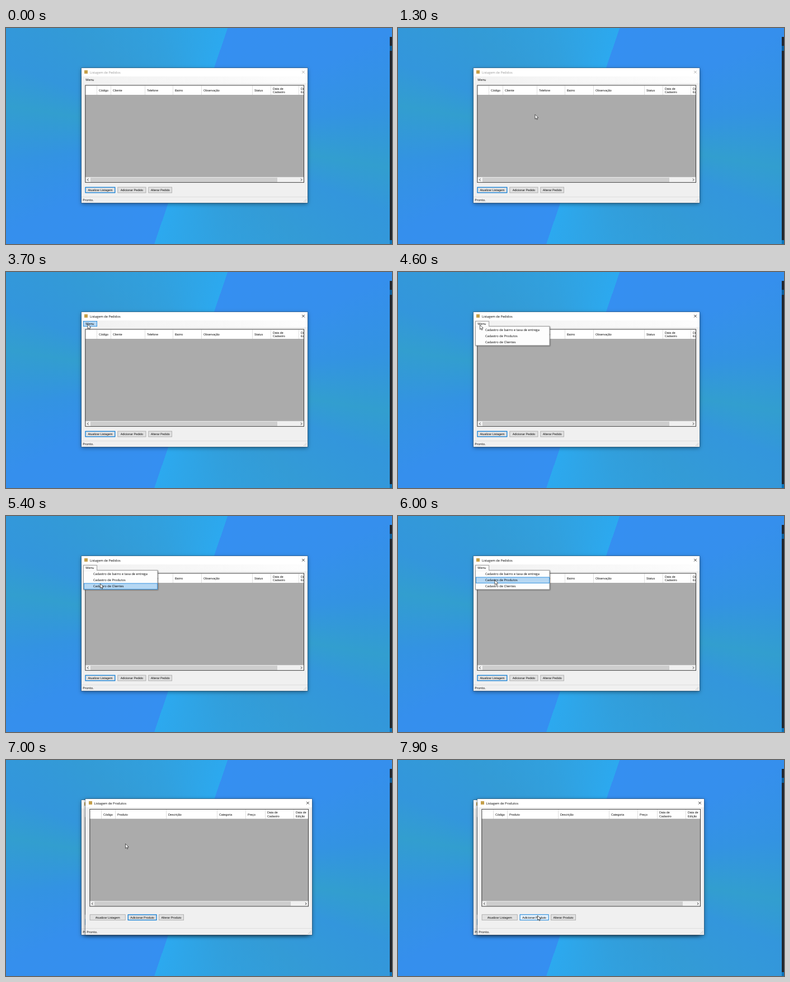
These frames come from a looping animation (690x388 px, 8000 ms). An HTML page with a canvas:

```html
<!DOCTYPE html>
<html lang="pt">
<head>
<meta charset="utf-8">
<style>
html, body { margin: 0; width: 100%; height: 100%; overflow: hidden; background: #3394e0; }
canvas { display: block; }
</style>
</head>
<body>
<canvas id="stage" width="690" height="388"></canvas>
<script>
const W = 690, H = 388, LOOP = 8000, STEP = 100;
const UI = '5.7px "Open Sans", sans-serif';
const GRID = '5.35px "Liberation Sans", Arial, sans-serif';
const BLUE = '#0078d7', PALE = '#b5d7f3', FACE = '#f0f0f0', INK = '#000';

const stage = document.getElementById('stage').getContext('2d');
const layerCanvas = document.createElement('canvas');
layerCanvas.width = W;
layerCanvas.height = H;
const layer = layerCanvas.getContext('2d');

const orders = {
  x: 135, y: 72, w: 404, h: 242, title: 'Listagem de Pedidos', titleX: 150, icon: 140, closeX: 531.5,
  grid: {
    x: 141.4, y: 102.5, w: 391.6, h: 175.3, thumb: [151, 485],
    cols: [[162, 'Código'], [187, 'Cliente'], [248, 'Telefone'], [298, 'Bairro'], [349, 'Observação'],
      [440, 'Status'], [473, 'Data de', 'Cadastro'], [523, 'Data de', 'Edição']]
  },
  buttonY: 285.6, focus: 0,
  buttons: [[141.4, 54, 'Atualizar Listagem'], [199.4, 51, 'Adicionar Pedido'], [254.4, 42.6, 'Alterar Pedido']],
  statusY: 303
};

const products = {
  x: 142, y: 70, w: 405, h: 244, title: 'Listagem de Produtos', titleX: 157.5, icon: 148, closeX: 539.5,
  grid: {
    x: 149.4, y: 88, w: 391.6, h: 175.3, thumb: [158, 509],
    cols: [[170, 'Código'], [195, 'Produto'], [286, 'Descrição'], [377, 'Categoria'], [428, 'Preço'],
      [463, 'Data de', 'Cadastro'], [514, 'Data de', 'Edição']]
  },
  buttonY: 277.3, focus: 1,
  buttons: [[149.7, 64, 'Atualizar Listagem'], [217.6, 52, 'Adicionar Produto'], [273, 45, 'Alterar Produto']],
  statusY: 302
};

const menuItems = ['Cadastro de bairro e taxa de entrega', 'Cadastro de Produtos', 'Cadastro de Clientes'];

// time, x, y of the pointer tip
const pointerPath = [
  [100, 3, 259], [200, 74, 168], [300, 120, 109], [900, 120, 109], [1100, 113, 82], [1400, 311, 192],
  [1600, 210, 128], [1800, 146, 94], [3800, 146, 94], [4100, 146.5, 95], [4800, 146.5, 95],
  [5500, 172, 126], [5600, 172, 126], [6000, 173, 115], [6600, 173, 115], [7000, 213.5, 150.5],
  [7100, 222, 194], [7400, 238, 240], [7600, 244, 258], [7900, 249.5, 279.5]
];

// time, opacity, scale of the opening window
const opening = [[6300, 0, 0.95], [6400, 0.4, 0.965], [6500, 0.8, 0.988], [6600, 0.95, 0.997], [6700, 1, 1]];

function sample(keys, t) {
  if (t <= keys[0][0]) return keys[0].slice(1);
  for (let i = 1; i < keys.length; i++) {
    const a = keys[i - 1], b = keys[i];
    if (t <= b[0]) {
      const k = (t - a[0]) / (b[0] - a[0]);
      return a.slice(1).map((v, j) => v + (b[j + 1] - v) * k);
    }
  }
  return keys[keys.length - 1].slice(1);
}

function rect(c, x, y, w, h, color) {
  c.fillStyle = color;
  c.fillRect(x, y, w, h);
}

function frame(c, x, y, w, h, color, width = 1) {
  c.strokeStyle = color;
  c.lineWidth = width;
  c.strokeRect(x + width / 2, y + width / 2, w - width, h - width);
}

function text(c, str, x, y, font, color = INK, align = 'left') {
  c.font = font;
  c.fillStyle = color;
  c.textAlign = align;
  c.fillText(str, x, y);
}

function line(c, points, color, width) {
  c.beginPath();
  points.forEach(p => c.lineTo(p[0], p[1]));
  c.strokeStyle = color;
  c.lineWidth = width;
  c.stroke();
}

function drawWallpaper(c) {
  const half = [[0, '#358ff1'], [0.12, '#358fed'], [0.175, '#3393e2'], [0.224, '#329ecf'],
    [0.258, '#3396dc'], [0.32, '#339bd6'], [0.4, '#31a0de'], [0.5, '#2ca9ef']];
  const g = c.createConicGradient(Math.atan2(-388, 131), 331, 193);
  for (const base of [0, 0.5]) half.forEach(([p, color]) => g.addColorStop(base + p, color));
  rect(c, 0, 0, W, H, g);
  rect(c, 686, 16, 4, 372, '#20262e');
  rect(c, 686, 32, 4, 9, '#0b5c98');
  rect(c, 686, 381, 4, 7, '#0b72b8');
}

function drawGrid(c, g, painted, hot) {
  const right = g.x + g.w, bottom = g.y + g.h, bar = bottom - 10;
  rect(c, g.x, g.y, g.w, g.h, '#ababab');
  rect(c, g.x, g.y, g.w, 18, '#fff');
  rect(c, g.x, bar, g.w, 10, FACE);
  rect(c, g.thumb[0], bar + 1, g.thumb[1] - g.thumb[0], 8, hot ? '#a6a6a6' : '#cdcdcd');
  c.save();
  c.beginPath();
  c.rect(g.x, g.y, g.w - 1, g.h);
  c.clip();
  g.cols.slice(0, painted ? 9 : 2).forEach(([x, top, low]) => {
    if (painted) rect(c, x, g.y + 1, 1, 17, '#dedede');
    text(c, top, x + 4, g.y + (low ? 8 : 11.5), GRID);
    if (low) text(c, low, x + 4, g.y + 14.7, GRID);
  });
  c.restore();
  if (!painted) return;
  rect(c, g.x, g.y + 17.6, g.w, 0.8, '#a2a2a2');
  const mid = bar + 4.8;
  line(c, [[g.x + 6, mid - 2], [g.x + 4, mid], [g.x + 6, mid + 2]], '#333', 1);
  line(c, [[right - 6, mid - 2], [right - 4, mid], [right - 6, mid + 2]], '#333', 1);
  frame(c, g.x, g.y, g.w, g.h, '#303030', 0.9);
}

function drawWindow(c, win, { active, painted = true, pointer = [0, 0] }) {
  const { x, y, w, h, grid } = win;
  const [px, py] = pointer;
  c.save();
  c.shadowColor = 'rgba(0,0,0,.45)';
  c.shadowBlur = 7;
  c.shadowOffsetY = 2;
  rect(c, x, y, w, h, FACE);
  c.restore();
  rect(c, x, y, w, 15, '#fff');

  const ink = active ? INK : '#999';
  rect(c, win.icon, y + 4, 6, 6, '#c5a04a');
  text(c, win.title, win.titleX, y + 9.6, UI, ink);
  const cx = win.closeX, cy = y + 7.2;
  line(c, [[cx - 2.3, cy - 2.3], [cx + 2.3, cy + 2.3]], ink, 0.8);
  line(c, [[cx - 2.3, cy + 2.3], [cx + 2.3, cy - 2.3]], ink, 0.8);

  if (win === orders) {
    const strip = c.createLinearGradient(x, 0, x + w, 0);
    strip.addColorStop(0, '#f1f1f1');
    strip.addColorStop(1, '#fdfdfd');
    rect(c, x, y + 15, w, 12, strip);
  }

  const overBar = px > grid.thumb[0] && px < grid.thumb[1] &&
    py >= grid.y + grid.h - 10 && py < grid.y + grid.h;
  drawGrid(c, grid, painted, overBar);

  win.buttons.forEach(([bx, bw, label], i) => {
    const by = win.buttonY, bh = 10.8;
    if (!painted) return rect(c, bx, by, bw, bh, '#fff');
    const hot = px >= bx && px < bx + bw && py >= by && py < by + bh;
    const focus = i === win.focus;
    rect(c, bx, by, bw, bh, hot ? '#e5f1fb' : '#e1e1e1');
    frame(c, bx, by, bw, bh, hot || focus ? BLUE : '#adadad', focus && !hot ? 1.2 : 0.9);
    text(c, label, bx + bw / 2, by + 7.5, GRID, INK, 'center');
  });

  rect(c, x, win.statusY, w, 1, '#dedede');
  text(c, 'Pronto.', x + 2.3, y + h - 3, UI);
  for (let i = 0; i < 3; i++)
    for (let j = 0; j <= i; j++) rect(c, x + w - 3 - j * 2, y + h - 7 + i * 2, 1, 1, '#b8b8b8');
  frame(c, x - 0.8, y - 0.8, w + 1.6, h + 1.6, 'rgba(60,80,100,.6)', 0.8);
}

function drawMenu(c, t, py) {
  const open = t >= 4600 && t < 6300;
  if (open) {
    c.save();
    c.shadowColor = 'rgba(0,0,0,.6)';
    c.shadowBlur = 2;
    c.shadowOffsetX = c.shadowOffsetY = 1;
    rect(c, 138, 97.3, 133.3, 35, '#fdfdfd');
    c.restore();
    frame(c, 138, 97.3, 133.3, 35, '#808080', 0.8);
    rect(c, 138, 88, 25, 10, '#fdfdfd');
    line(c, [[138.4, 98], [138.4, 88.4], [162.6, 88.4], [162.6, 98]], '#808080', 0.8);
    const hot = Math.floor((py - 98.5) / 11);
    menuItems.forEach((label, i) => {
      const top = 98.7 + i * 11;
      if (i === hot) {
        rect(c, 139, top, 132, 11, PALE);
        frame(c, 139, top, 132, 11, BLUE, 0.7);
      }
      text(c, label, 156, top + 7.5, UI);
    });
  } else if (t >= 2300 && t < 4600) {
    rect(c, 138, 88, 25, 10, PALE);
    frame(c, 138, 88, 25, 10, BLUE, 0.7);
  }
  text(c, 'Menu', 142.3, 95.2, UI);
}

function drawPointer(c, x, y) {
  c.beginPath();
  [[0, 0], [0, 8.2], [1.9, 6.5], [3.2, 9.3], [4.5, 8.7], [3.3, 6], [5.8, 5.8]]
    .forEach(([dx, dy]) => c.lineTo(x + dx, y + dy));
  c.closePath();
  c.fillStyle = '#fff';
  c.fill();
  c.strokeStyle = '#222';
  c.lineWidth = 0.75;
  c.stroke();
}

function draw(t) {
  const pointer = sample(pointerPath, t);
  drawWallpaper(stage);
  drawWindow(stage, orders, { active: t >= 2300 && t < 6400 });
  drawMenu(stage, t, pointer[1]);

  if (t >= 6400) {
    const [alpha, scale] = sample(opening, t);
    layer.clearRect(0, 0, W, H);
    drawWindow(layer, products, { active: true, painted: t >= 6600, pointer });
    const cx = products.x + products.w / 2, cy = products.y + products.h / 2;
    stage.save();
    stage.globalAlpha = alpha;
    stage.translate(cx, cy);
    stage.scale(scale, scale);
    stage.drawImage(layerCanvas, -cx, -cy);
    stage.restore();
  }
  if (t >= 100) drawPointer(stage, ...pointer);
}

for (const c of [stage, layer]) c.textRendering = 'geometricPrecision';

const start = performance.now();
function tick() {
  const t = (performance.now() - start) % LOOP;
  draw(Math.floor(t / STEP) * STEP);
  requestAnimationFrame(tick);
}
tick();
</script>
</body>
</html>
```
